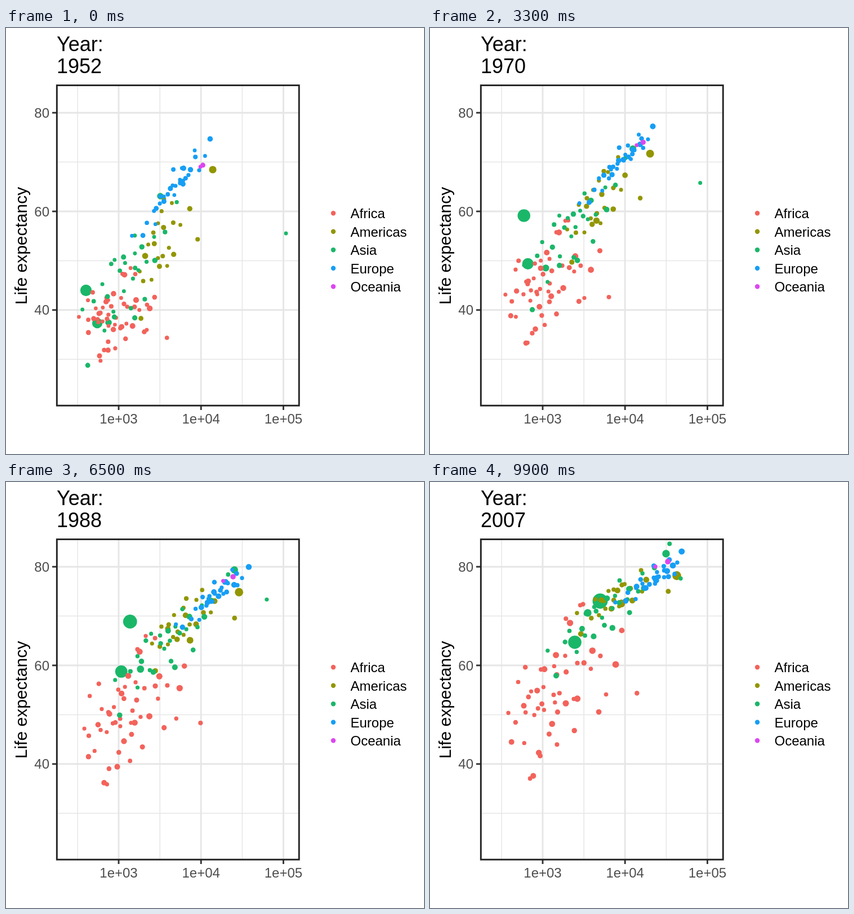
Recreate the animation shown at these times as an HTML page. Size 742 by 755 pixels, loop 10 s.

```html
<!DOCTYPE html>
<html lang="en">
<head>
<meta charset="utf-8">
<title>Life expectancy by year</title>
<style>
  html, body { margin: 0; width: 100%; height: 100%; overflow: hidden; background: #fff; }
  svg { display: block; width: 742px; height: 755px; }
  text { font-family: "Liberation Sans", Arial, sans-serif; font-size: 24px; }
  .axis { fill: #4d4d4d; }
  .title { font-size: 36px; }
  .label { font-size: 30px; }
</style>
</head>
<body>
<svg id="chart" viewBox="0 0 742 755"></svg>
<script>
const FRAME_MS = 100, FRAMES = 100, FIRST_YEAR = 1952, LAST_YEAR = 2007, SURVEYS = 11;

// Clouds go from one spread to another: [mean x, spread x, mean y, trend of y, spread of y].
const continents = [
  { name: "Africa", color: "#f2635b", count: 52, skew: 0.15,
    from: [196, 40, 508, -6, 40], to: [228, 60, 370, -35, 68] },
  { name: "Americas", color: "#929600", count: 23, skew: 0.1,
    from: [280, 32, 385, -45, 55], to: [330, 45, 208, -24, 20] },
  { name: "Asia", color: "#1ab769", count: 28, skew: 0,
    from: [215, 46, 443, -42, 55], to: [312, 62, 228, -46, 28] },
  { name: "Europe", color: "#169ef5", count: 30, skew: -0.1,
    from: [298, 38, 283, -45, 16], to: [397, 33, 171, -22, 10] },
  { name: "Oceania", color: "#dc46f0", count: 2, skew: 0,
    from: [348, 3, 244, -2, 0], to: [415, 15, 144, -6, 0] }
];

// Countries that stand out; bend holds the easing power of x and of y.
const landmarks = [
  { group: 2, r: 10.2, from: [142, 465], to: [302, 211], bend: [1.7, 0.55] },
  { group: 2, r: 9.2, from: [162, 523], to: [257, 284], bend: [1.9, 0.7] },
  { group: 1, r: 6.6, from: [367, 251], to: [438, 166], bend: [1, 1] },
  { group: 2, r: 5.8, from: [274, 298], to: [419, 127], bend: [0.45, 0.6] },
  { group: 2, r: 5.8, from: [182, 522], to: [280, 232], bend: [1.3, 1] },
  { group: 1, r: 5.4, from: [247, 404], to: [340, 216], bend: [0.55, 1] },
  { group: 2, r: 3.4, from: [497, 364], to: [445, 171], bend: [1, 0.65] }
];

const svg = document.getElementById("chart");
const fract = v => v - Math.floor(v);
const mix = (a, b, k) => a + (b - a) * k;
// Powers above 1 start slowly, powers below 1 end slowly.
const ease = (k, power) => power < 1 ? 1 - (1 - k) ** (1 / power) : k ** power;
const noise = (seed, step) => fract(Math.sin(seed * 12.99 + step * 78.23) * 43758.55) - 0.5;

// Turns an even share of 0..1 into a bell-shaped offset with short tails.
function bell(share) {
  const u = mix(0.03, 0.97, share);
  return Math.log(u / (1 - u)) / 1.75;
}

function add(tag, attrs, content = "") {
  const node = document.createElementNS("http://www.w3.org/2000/svg", tag);
  for (const key in attrs) node.setAttribute(key, attrs[key]);
  node.textContent = content;
  return svg.appendChild(node);
}

const line = (x1, y1, x2, y2, stroke, width) =>
  add("line", { x1, y1, x2, y2, stroke, "stroke-width": width });
const label = (x, y, content, attrs) => add("text", { x, y, ...attrs }, content);

// Small drift that turns at every five-year survey.
function drift(seed, k) {
  const step = Math.floor(k * SURVEYS);
  return 12 * mix(noise(seed, step), noise(seed, step + 1), k * SURVEYS - step);
}

function drawAxes() {
  const grid = "#e6e6e6";
  for (let i = 0; i < 3; i++) {
    const x = 127 + 146.2 * i, y = 237.6 + 174.8 * i;
    line(x, 102, x, 669, grid, 1.5);
    line(90, y, 520, y, grid, 1.5);
  }
  for (let i = 0; i < 3; i++) {
    const x = 200 + 146.2 * i, y = 150.2 + 174.8 * i;
    line(x, 102, x, 669, grid, 2.9);
    line(90, y, 520, y, grid, 2.9);
    line(x, 670, x, 677, "#333", 2.9);
    line(82, y, 89, y, "#333", 2.9);
    label(x, 700.5, `1e+0${3 + i}`, { class: "axis", "text-anchor": "middle" });
    label(77, y + 8.5, 80 - 20 * i, { class: "axis", "text-anchor": "end" });
  }
  label(0, 0, "Life expectancy",
    { class: "label", "text-anchor": "middle", transform: "translate(36.5 386) rotate(-90)" });
  label(90, 41, "Year:", { class: "title" });
}

function drawLegend() {
  continents.forEach(({ name, color }, i) => {
    const y = 328.3 + 32.5 * i;
    add("circle", { cx: 581, cy: y, r: 4.2, fill: color });
    label(611.5, y + 9, name);
  });
}

function addDot(group, r, place) {
  return { r, place, node: add("circle", { fill: continents[group].color }) };
}

function landmarkDot({ group, r, from, to, bend }) {
  return addDot(group, r, k => from.map((v, axis) => mix(v, to[axis], ease(k, bend[axis]))));
}

function cloudDot(group, i) {
  const { count, skew, from, to } = continents[group];
  const seed = group * 60 + i;
  const z = bell((i + 0.5 + 0.6 * noise(seed, 20)) / count);
  const across = z + skew * (z * z - 1);
  const up = bell(fract((i + 0.5) * 0.618034 + 0.3 * noise(seed, 30)));
  const sway = count > 2 ? 1 : 0;
  const r = 3.4 + 1.8 * fract(i * 0.7549) ** 2;
  return addDot(group, r, k => {
    const [mx, sx, my, trend, sy] = from.map((v, j) => mix(v, to[j], ease(k, 0.8)));
    return [mx + sx * across + sway * drift(seed, k),
            my + trend * across + sy * up + sway * drift(seed + 0.5, k)];
  });
}

drawAxes();
const dots = landmarks.map(landmarkDot);
continents.forEach(({ count }, group) => {
  for (let i = 0; i < count; i++) dots.push(cloudDot(group, i));
});
add("rect", { x: 90.3, y: 101.6, width: 429.9, height: 567.6,
  fill: "none", stroke: "#222", "stroke-width": 2.9 });
drawLegend();
const yearText = label(90, 80, "", { class: "title" });

function update(ms) {
  const k = Math.floor(ms / FRAME_MS) % FRAMES / (FRAMES - 1);
  yearText.textContent = Math.round(mix(FIRST_YEAR, LAST_YEAR, k));
  for (const { node, place, r } of dots) {
    const [x, y] = place(k);
    // Larger populations also grow faster.
    const radius = r * (1 + 0.035 * (r - 1) * k);
    node.setAttribute("cx", x.toFixed(2));
    node.setAttribute("cy", y.toFixed(2));
    node.setAttribute("r", radius.toFixed(2));
  }
}

const start = performance.now();
function tick() {
  update(performance.now() - start);
  requestAnimationFrame(tick);
}
tick();
</script>
</body>
</html>
```
